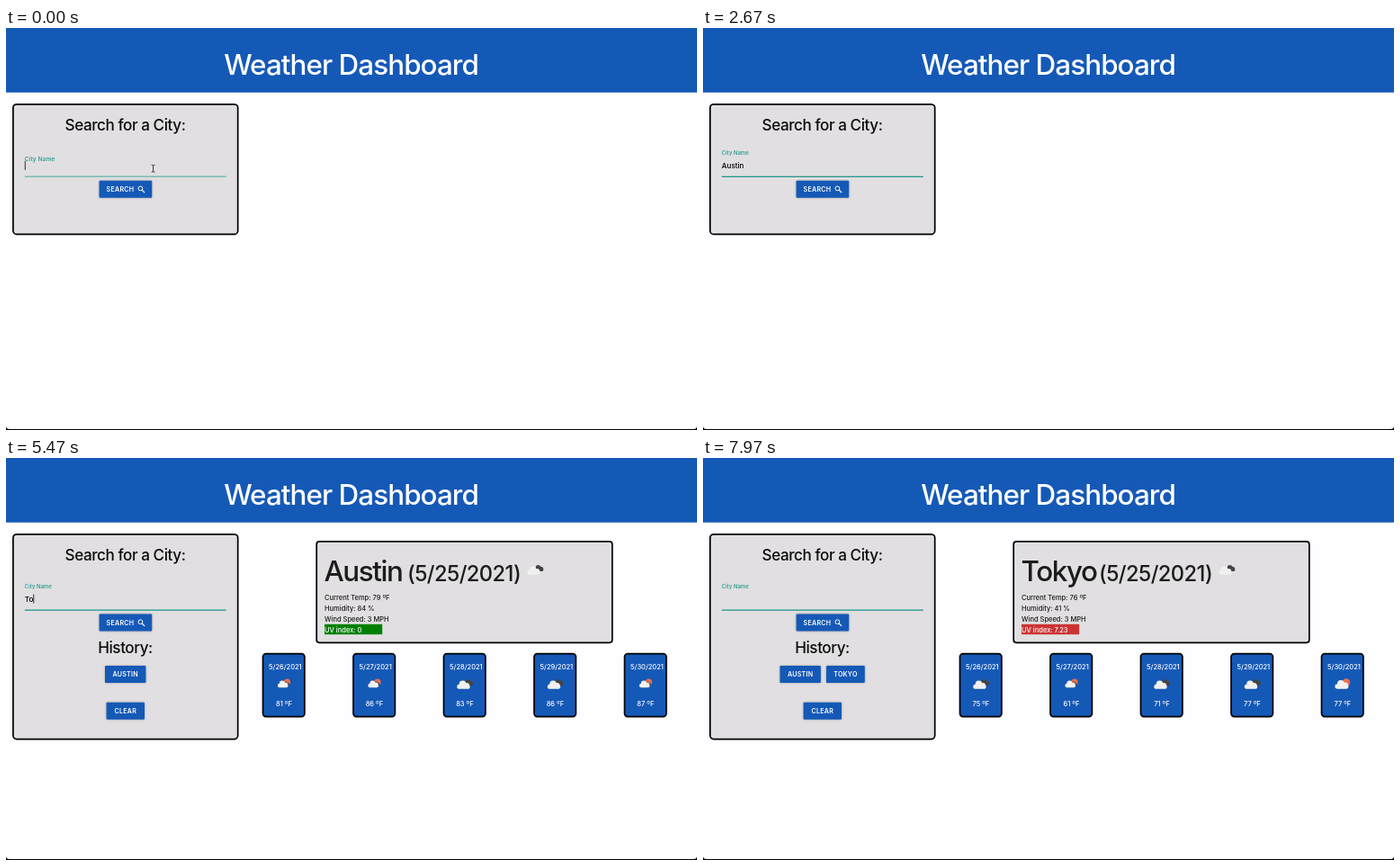
Write an HTML page that moves like this. It is 768 px wide and 447 px high and loops after 8 s.

```html
<!DOCTYPE html>
<html lang="en">
<head>
<meta charset="utf-8">
<title>Weather Dashboard</title>
<style>
  html, body { margin: 0; width: 100%; height: 100%; overflow: hidden; background: #fefdff; }
  svg { display: block; width: 768px; height: 447px; font-family: Inter, Roboto, sans-serif; font-size: 7.5px; font-weight: 450; fill: #1c1c1c; }
  .card { fill: #e1dfe1; stroke: #000; stroke-width: 1.7; }
  .title { font-size: 31.4px; letter-spacing: -.03em; }
  .city { letter-spacing: -.045em; }
  .date { font-size: 23.7px; letter-spacing: -.025em; }
  .heading { font-size: 17.1px; letter-spacing: -.026em; fill: #0c0c0c; }
  .mid { text-anchor: middle; }
  .white { fill: #fff; }
  .blue { fill: #1559b7; }
  .button rect { fill: #1559b7; filter: drop-shadow(0 .9px .9px #0005); }
  .button text { fill: #fff; font-size: 7.1px; font-weight: 600; letter-spacing: .25px; }
  .day rect { fill: #1559b7; stroke: #000; stroke-width: 1.7; }
  .day text { fill: #fff; font-weight: 500; }
  .teal { fill: #22988d; }
  #typed { font-size: 8.1px; fill: #000; }
</style>
</head>
<body>
<svg viewBox="0 0 768 447">
  <defs>
    <g id="cloud">
      <rect x="-8.5" y="0" width="15" height="5.6" rx="2.8"/>
      <circle cx="-2" cy="-.4" r="3.9"/><circle cx="2.8" cy="1.3" r="3"/>
    </g>
    <g id="broken">
      <use href="#cloud" transform="translate(4.9 -2.2) scale(.7)" fill="#444"/>
      <use href="#cloud" transform="translate(-.5 .3) scale(.95)" fill="#f0f0f0"/>
    </g>
    <g id="sunny">
      <circle cx="4" cy="-1.6" r="4.3" fill="#ec6e4c"/>
      <use href="#cloud" fill="#f2f2f2"/>
    </g>
    <g id="rain" transform="scale(.82)">
      <circle cx="4.3" cy="-2.6" r="4.5" fill="#ec6e4c"/>
      <use href="#cloud" transform="translate(3.4 -.6) scale(.6)" fill="#484848"/>
      <use href="#cloud" transform="translate(-.5 -.5) scale(.95)" fill="#f2f2f2"/>
    </g>
  </defs>

  <rect class="blue" width="768" height="71.7"/>
  <text class="title mid white" x="383.5" y="52.1">Weather Dashboard</text>

  <rect class="card" id="panel" x="7.9" y="84.8" width="249.8" height="144.6" rx="4"/>
  <text class="heading mid" x="132.5" y="114">Search for a City:</text>
  <g id="form">
    <text class="teal" id="label">City Name</text>
    <text id="typed" x="20.8" y="156"></text>
    <rect id="caret" y="147.8" width=".9" height="10"/>
    <rect class="teal" id="underline" x="20.8" y="164.7" width="224"/>
    <g class="button">
      <rect x="103.6" y="169.8" width="58.6" height="19" rx="1"/>
      <text x="111.6" y="181.8">SEARCH</text>
      <g fill="none" stroke="#fff"><circle cx="149.4" cy="178.4" r="2.4"/><path d="M151.2 180.2l2.9 2.9" stroke-width="1.2"/></g>
    </g>
  </g>
  <g id="history">
    <text class="heading mid" x="132.5" y="217">History:</text>
    <g id="buttons"></g>
  </g>
  <g id="weather"></g>

  <g id="pointer" fill="none" stroke="#222" stroke-width=".9">
    <path d="M-1.8-4Q0-4 0-3Q0-4 1.8-4M-1.8 4Q0 4 0 3Q0 4 1.8 4M0-3V3"/>
  </g>
  <path d="M0 442.5Q0 446 4 446H764Q768 446 768 442.5V447H0Z" fill="#000"/>
</svg>
<script>
const LOOP = 8000, BLINK = 500;
const $ = id => document.getElementById(id);

const cities = [
  { name: 'Austin', keys: [1250, 1390, 1490, 1600, 1720, 1850], shown: 2800, dateX: 447, iconX: 588,
    lines: ['Current Temp: 79 ºF', 'Humidity: 84 %', 'Wind Speed: 3 MPH', 'UV index: 0'], uv: '#008000',
    days: [['rain', 81], ['rain', 86], ['broken', 83], ['broken', 86], ['rain', 87]],
    buttons: [['AUSTIN', 110, 45.4]] },
  { name: 'Tokyo', keys: [5300, 5450, 5600, 5750, 5930], shown: 7050, dateX: 441, iconX: 582,
    lines: ['Current Temp: 76 ºF', 'Humidity: 41 %', 'Wind Speed: 3 MPH', 'UV index: 7.23'], uv: '#cb3433',
    days: [['broken', 75], ['rain', 61], ['broken', 71], ['broken', 77], ['sunny', 77]],
    buttons: [['AUSTIN', 85.5, 45.4], ['TOKYO', 137, 42.8]] }
];

const button = ([text, x, width], y) => `<g class="button">
  <rect x="${x}" y="${y}" width="${width}" height="19" rx="1"/>
  <text class="mid" x="${x + width / 2}" y="${y + 12}">${text}</text></g>`;

const day = ([icon, temp], i) => `<g class="day" transform="translate(${284.6 + i * 100.5} 216.7)">
  <rect x=".9" y=".9" width="46.4" height="70" rx="3.5"/>
  <text x="7.5" y="18.4">5/${26 + i}/2021</text>
  <use href="#${icon}" x="24.3" y="34.5"/>
  <text class="mid" x="24.3" y="59.4">${temp} ºF</text></g>`;

const weather = c => `<rect class="card" x="345.2" y="92.9" width="328.6" height="112.4" rx="3"/>
  <text class="title city" x="353.5" y="137.3">${c.name}</text>
  <text class="date" x="${c.dateX - 1}" y="137.3">(5/25/2021)</text>
  <use href="#broken" x="${c.iconX}" y="124.2"/>
  <rect x="354" y="184.8" width="64.2" height="11.4" fill="${c.uv}"/>
  ${c.lines.map((s, i) => `<text x="354" y="${158.4 + i * 11.7}" class="${i > 2 ? 'white' : ''}">${s}</text>`).join('')}
  ${c.days.map(day).join('')}`;

let current;
function showCity(city) {
  if (city === current) return;
  current = city;
  $('weather').innerHTML = city ? weather(city) : '';
  $('buttons').innerHTML = city ? city.buttons.map(b => button(b, 231)).join('') + button(['CLEAR', 111.6, 42.4], 271.8) : '';
  $('history').style.display = city ? '' : 'none';
  $('panel').setAttribute('height', city ? 227.8 : 144.6);
  $('form').setAttribute('transform', `translate(0 ${city ? 3.8 : 0})`);
}

function render(t) {
  showCity(cities.findLast(c => t >= c.shown) || null);

  const typing = cities.find(c => t >= c.keys[0] && t < c.shown);
  $('typed').textContent = typing ? typing.name.slice(0, typing.keys.filter(k => k <= t).length) : '';
  $('caret').setAttribute('x', 20.8 + (typing ? $('typed').getComputedTextLength() : 0));

  // The blink restarts on each keystroke and when the field is cleared.
  const restarts = cities.flatMap(c => [...c.keys, c.shown]);
  const last = restarts.findLast(k => k <= t) ?? -80;
  $('caret').style.display = (t - last) % (2 * BLINK) < BLINK ? '' : 'none';

  const focus = 1 - (1 - Math.min(t / 120, 1)) ** 2;
  $('label').setAttribute('transform', `translate(20.8 ${148 - 7 * focus}) scale(${.9 - .1 * focus})`);
  $('underline').setAttribute('height', .8 + .5 * Math.min(t / 220, 1));

  const visible = t < cities[0].keys[0] || (t >= 4300 && t < cities[1].keys[0]);
  const move = Math.min(Math.max((t - 4300) / 300, 0), 1);
  const eased = move * move * (3 - 2 * move);
  $('pointer').style.display = visible ? '' : 'none';
  $('pointer').setAttribute('transform', `translate(${163.6 - 22.4 * eased} ${156.3 + eased})`);
}

function tick(now) {
  render(now % LOOP);
  requestAnimationFrame(tick);
}
render(0);
requestAnimationFrame(tick);
</script>
</body>
</html>
```
